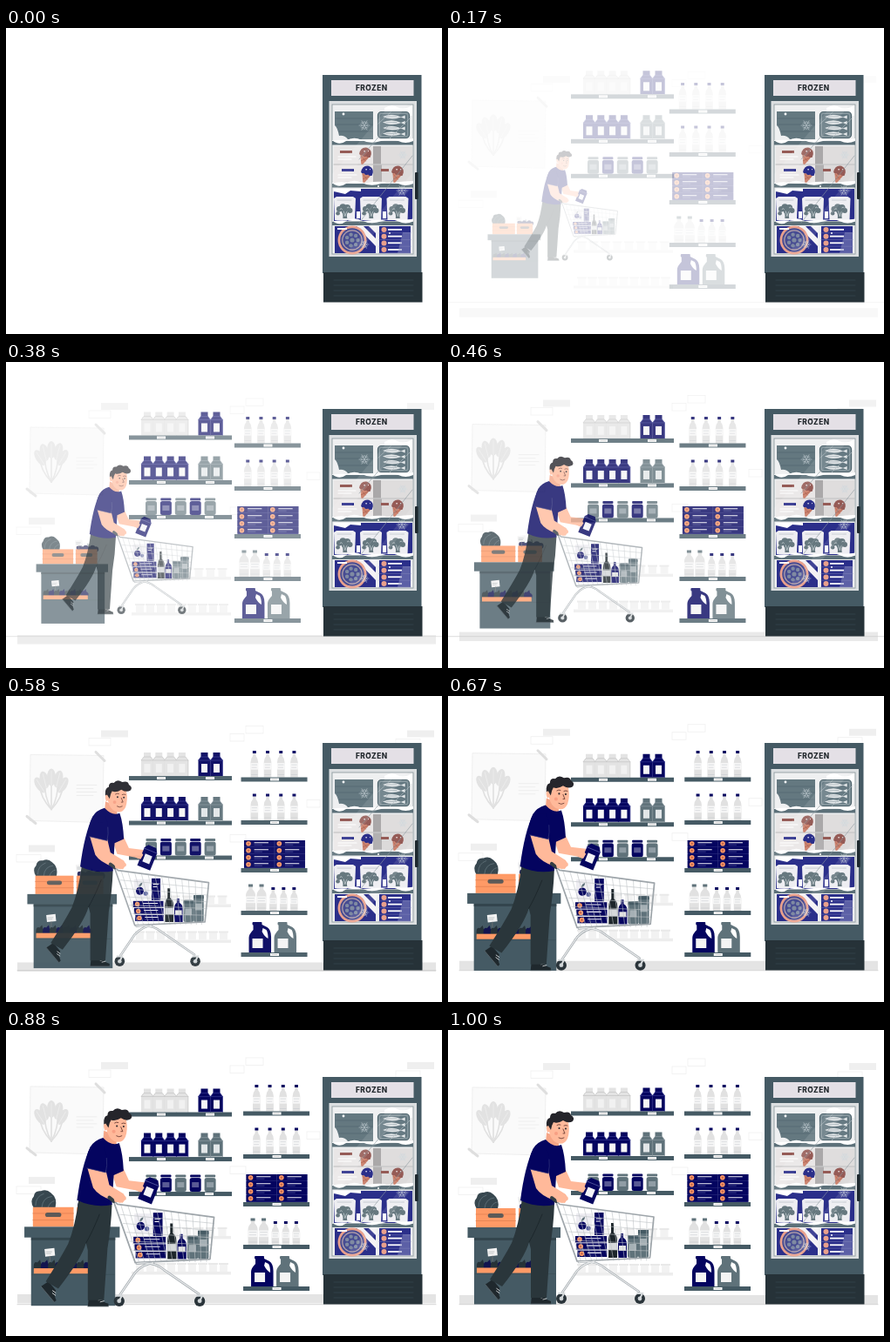
Recreate the animation shown at these times as an HTML page. Size 500 by 352 pixels, loop 1.04 s.

```html
<!DOCTYPE html>
<html lang="en">
<head>
<meta charset="utf-8">
<title>Frozen aisle</title>
<style>
html, body { margin: 0; width: 100%; height: 100%; overflow: hidden; background: #fff; }
svg { display: block; width: 500px; height: 352px; }
</style>
</head>
<body>
<svg viewBox="0 0 500 352">
  <g id="back"></g><g id="line"></g><g id="milk"></g><g id="drinks"></g>
  <g id="fridge"></g><g id="stand"></g><g id="shopper"></g>
</svg>
<script>
const NAVY = '#04045f', SLATE = '#455a64', GREY = '#5f727a', DARK = '#263238',
  ORANGE = '#ff9a66', SKIN = '#ffb99a', PALE = '#e3e3e3';

const rect = (x, y, w, h, fill, more = '') => `<rect x="${x}" y="${y}" width="${w}" height="${h}" fill="${fill}" ${more}/>`;
const path = (d, fill, more = '') => `<path d="${d}" fill="${fill}" ${more}/>`;
const stroke = (d, color, width = 1, more = '') => path(d, 'none', `stroke="${color}" stroke-width="${width}" stroke-linecap="round" ${more}`);
const circle = (x, y, r, fill) => `<circle cx="${x}" cy="${y}" r="${r}" fill="${fill}"/>`;
const oval = (x, y, rx, ry, fill) => `<ellipse cx="${x}" cy="${y}" rx="${rx}" ry="${ry}" fill="${fill}"/>`;
const move = (x, y, s, turn = 0, size = 1) => `<g transform="translate(${x} ${y}) rotate(${turn}) scale(${size})">${s}</g>`;
const each = (list, draw) => list.map(draw).join('');
const count = (n, draw) => Array.from({ length: n }, (_, i) => draw(i)).join('');
const put = (id, s) => document.getElementById(id).innerHTML = s;

// Wall, poster, floor and distant shelves
function back() {
  const solid = [[109, 38, 31], [460, 38, 31], [26, 170, 30], [310, 165, 16]];
  const hollow = [[95, 47, 25], [447, 48, 28], [275, 33, 20], [257, 42, 16], [12, 181, 28], [345, 118, 15], [257, 158, 18]];
  const leaves = [[39, 101, -32], [65, 101, 30], [44, 95, -14], [60, 94, 14], [52, 92, 0]];
  const row = (y, n) => rect(144, y, 114, 3.5, '#ededed') +
    count(n, i => rect(149 + i * 108 / n, y - 9, 9, 9, '#f2f2f2') + rect(148 + i * 108 / n, y - 10, 11, 2, '#e9e9e9'));
  return each(solid, ([x, y, w]) => rect(x, y, w, 8, '#efefef')) +
    each(hollow, ([x, y, w]) => rect(x, y, w, 8.5, 'none', 'stroke="#efefef" stroke-width=".8"')) +
    path('M28,66L112,67L111,144L27,142Z', '#fafafa', 'stroke="#ebebeb" stroke-width=".8"') +
    each(leaves, ([x, y, turn]) => stroke(`M${x},${y}Q${x},115 52,129`, '#e0e0e0', 1.6) +
      move(x, y, oval(0, 0, 5, 10, '#e2e2e2') + stroke('M0,-7V9', '#f1f1f1', .6), turn)) +
    each([101, 105, 109, 113], (y, i) => stroke(`M81,${y}H${104 - i % 2 * 4}`, '#ececec', .9)) +
    stroke('M103,63L113,73M24,137L34,145', '#dedede', 3, 'stroke-linecap="butt"') +
    row(238, 8) + row(279, 9) + rect(13, 305, 480, 10.5, '#e4e4e4');
}

const shelf = (x, y, w, tags) => rect(x, y, w, 5, SLATE) +
  each(tags, t => rect(t, y + 1, 10, 3, '#fff') + stroke(`M${t + 2},${y + 2.5}h6`, '#999', .5));

const carton = (x, y, fill, shade, label) => move(x, y,
  path('M0,27V9L3,5V0H11V5L14,9V27Z', fill) + stroke('M14,27V9L11,5H3L0,9H14', shade, .7) +
  rect(3.5, 13, 7, 10, label));

const jar = (x, fill) => rect(x, 169, 13, 16, fill, 'rx="2.5"') + rect(x + .5, 165.5, 12, 3, fill, 'rx=".8"') +
  rect(x + 1, 168.4, 11, .7, '#fff', 'opacity=".5"') + rect(x + 2.5, 174, 8, 6, '#dadde6', 'opacity=".4"');

function milk() {
  const run = (y, a, sa, la, b, sb, lb) => each([155, 168.3, 181.6, 194.9], x => carton(x, y, a, sa, la)) +
    each([220.5, 234.5], x => carton(x, y, b, sb, lb));
  return run(66.5, PALE, '#c3c3c3', '#f1f1f1', NAVY, '#363890', '#f6f6f6') + shelf(141, 93.5, 118, [173, 229]) +
    run(117.5, NAVY, '#363890', '#f6f6f6', GREY, '#8b999f', '#e2e6e8') + shelf(141, 145, 118, [173, 229]) +
    each([GREY, NAVY, GREY, NAVY, GREY], (fill, i) => jar(160 + i * 16.9, fill)) + shelf(141, 185, 118, [173, 228]);
}

const bottle = (x, y, w, h, cap) => move(x, y,
  path(`M0,${h}V13Q0,9 ${w * .3},6V2H${w * .7}V6Q${w},9 ${w},13V${h}Z`, '#e1e1e1') +
  rect(w * .27, 0, w * .46, 3, cap) + rect(0, h * .46, w, h * .25, '#f7f7f7') +
  stroke(`M1.5,${h * .53}H${w - 1.5}M1.5,${h * .63}H${w - 2}M1,${h - 3}H${w - 1}`, '#c6c9ce', .6));

const jug = (x, fill) => move(x, 260,
  path('M0,35V18Q0,14 5,9V3H15L21,6Q25.5,9 25.5,17V35Z', fill) + rect(4, 0, 11, 3.4, fill, 'rx="1"') +
  path('M16,7L20,9Q22,12 22,19Q18,17 15,11Z', '#fff') + rect(4, 19, 12, 11, '#f4f4f4'));

const mealRow = (x, y, w) => rect(x, y, w, 7.4, NAVY) + circle(x + 5, y + 3.7, 2.8, ORANGE) +
  circle(x + 5, y + 3.7, 1.3, '#c8694f') + stroke(`M${x + 12},${y + 2.8}H${x + w - 7}`, '#f3f3fa', 1.1) +
  stroke(`M${x + 12},${y + 5.2}H${x + w - 14}`, '#6a6eac', .5);

function drinks() {
  const four = y => count(4, i => bottle(282 + i * 15.2, y, 8.6, 30.5, NAVY));
  return four(63) + four(112.5) +
    rect(274.5, 166, 70, 32, '#2b2d7c') +
    count(8, i => mealRow(274.5 + i % 2 * 35.3, 166 + (i >> 1) * 8, 34.5)) +
    each([276.5, 289], x => bottle(x, 216.5, 11, 30.5, GREY)) +
    each([303.5, 315.5, 327.5], x => bottle(x, 220, 8.6, 27, NAVY)) +
    jug(280, NAVY) + jug(309, GREY) +
    each([93.5, 143, 198, 247, 295], y => shelf(271, y, 76, [304.5]));
}

const flake = (x, y, r) => each([0, 60, 120], a => move(x, y,
  stroke(`M${-r},0H${r}M${-r * .7},${-r * .25}L${-r * .4},0L${-r * .7},${r * .25}M${r * .7},${-r * .25}L${r * .4},0L${r * .7},${r * .25}`, '#cfd8dc', .5), a));

const cone = (x, y, scoop) => move(x, y,
  path('M-6,1L6,1L1,13L-1,13Z', '#cd8571') + stroke('M-4,4L3,8M4,4L-2,9', '#a9604f', .6) +
  path('M-7,2Q-8,-7 0,-8Q8,-7 7,2Q4,4 2,2Q-1,5 -3,2Q-5,4 -7,2Z', scoop) + circle(-2, -3, .8, '#fff') + circle(2.5, -4.5, .6, '#fff'), 18, .95);

const broccoli = (x, y) => move(x, y,
  each([[-7, -2, 4], [-2, -5, 4.6], [4, -4, 4.6], [8, 0, 3.6], [-9, 4, 2.8], [0, 0, 4]], ([a, b, r]) => circle(a, b, r, '#66787f')) +
  path('M-5,0Q-1,4 -2,11H4Q2,4 7,1Z', '#66787f') + stroke('M-1,1L1,8L3,2M-6,-2q2,-2 3,0M4,-4q2,-2 3,0', '#dde3e6', .8), 0, .82);

const ledge = (y, dip) => rect(374, y, 93, 4.5, '#5c7079') +
  path(`M374,${y}q8,${-dip} 18,-1t22,0t20,-1t18,0t15,-1v3q-9,4 -17,0t-20,0t-22,-1t-18,1t-16,-1Z`, '#fff');

function fridge() {
  const blue = '#2b2f8a', brown = '#955b56';
  const top = path('M377,96H421V128H392Q388,123 382,124Q380,114 377,112Z', '#647880') +
    stroke('M378,104H420M379,111H420M382,119H420', '#4f646d', .6) + circle(387, 99, 1.4, '#fff') + flake(411, 112, 6) +
    path('M434,92Q442,87 449,91T466,89V101H434Z', '#fff') +
    rect(426.5, 96.5, 36, 30, '#84959c', 'rx="4" stroke="#4b616a" stroke-width="1.2"') +
    rect(429, 99, 31, 25, '#667a83', 'rx="2"') +
    count(4, i => path(`M431,${102 + i * 6.5}q11,-5 22,0l5,-2v5l-5,-2q-11,4 -22,-1Z`, '#e4e8ea', 'stroke="#4b616a" stroke-width=".5"') +
      stroke(`M436,${102 + i * 6.5}h12`, '#8a999f', .6)) +
    stroke('M427,110L441,97M440,127L463,104', '#b4c0c5', .6);
  const ice = rect(376, 136, 45, 20.5, '#e9e6e6') + rect(421, 136, 9, 20.5, '#aaa8a9') + rect(430, 136, 36, 20.5, '#dfdddd') +
    rect(376, 157.5, 45, 20.5, '#ebe8e8') + rect(421, 157.5, 10, 20.5, '#b2b0b1') + rect(431, 157.5, 35, 20.5, '#dcdada') +
    rect(383, 141, 14, 3, brown) + rect(385, 162, 14, 3, blue) + rect(430, 162, 9, 3, brown) +
    stroke('M381,148H401M381,151H396M381,169H402M381,172H396', '#fff', 1.2) +
    stroke('M376,157H466', '#999', .6) +
    cone(412, 145, brown) + cone(414, 166, blue) + cone(449, 166, brown) + flake(455, 146, 5);
  const veg = rect(376, 185, 90, 37, blue) + path('M376,185H407V188L395,187L389,191L376,188Z', '#fff') +
    each([377, 407, 437.5], x => path(`M${x - 1},196L${x + 2},194H${x + 21}L${x + 24},196L${x + 23},221H${x}Z`, '#eeeef2') +
      stroke(`M${x + 3},198h16`, '#b9bfc6', .8) + broccoli(x + 11, 210)) +
    each([402, 432], x => rect(x, 211, 4, 8, '#fff')) + flake(454, 187, 6);
  const pizza = rect(377, 228, 47, 31, blue) +
    path('M402,228h8l14,14v9ZM416,228h8v8Z', '#f4f2f5') +
    circle(397, 244, 16.5, '#e9a08c') + circle(397, 244, 13.8, '#474c92') +
    circle(397, 244, 11.8, '#b9a4ab') + circle(397, 244, 10.6, '#474c92') +
    count(7, i => circle(397 + 6.5 * Math.cos(i * .9), 244 + 6.5 * Math.sin(i * .9), 2.2, '#7f8aa2')) +
    circle(397, 244, 2.6, '#7f8aa2') + rect(380, 230, 11, 2, '#fff') + flake(411, 249, 5) +
    rect(428, 228, 36, 31, blue) +
    count(4, i => circle(433.5, 232 + i * 7.7, 3, '#e9a08c') + rect(438, 231 + i * 7.7, 16, 1.8, '#fff') +
      stroke(`M428,${235.8 + i * 7.7}h36`, '#6669a8', .6)) +
    path('M455,235h9v24h-15Z', '#8e91c2', 'opacity=".5"');
  return rect(363, 54, 113.5, 228, SLATE) + rect(364, 281, 113.5, 34.5, DARK) +
    stroke('M376,290H467M376,296H467M376,302H467M376,308H467', '#34454d', .8) +
    rect(373, 60, 94.5, 18, '#e4e0e6') +
    '<text x="419.2" y="72.2" text-anchor="middle" font-family="Inter, Roboto, sans-serif" font-weight="800" font-size="8.4" letter-spacing=".4" fill="#22282d">FROZEN</text>' +
    stroke('M414.6,65.4l1.4,1.2l1.4,-1.2', '#22282d', .8) +
    rect(370.5, 84, 100.5, 179, '#dcdfe1') + rect(374, 88, 93, 172, '#eff0f1', 'stroke="#87949a" stroke-width=".8"') +
    top + ledge(130, 2) + ice + ledge(179, 3) + veg + ledge(222.5, 2) + pizza +
    path('M374,168L441,88H461L374,192ZM390,260L467,165V181L403,260Z', '#fff', 'opacity=".1"') +
    stroke('M405,224L466,147M405,151L438,113', '#8d999f', .6) +
    circle(427, 182, 1, '#fff') + circle(440, 236, 1, '#fff') + rect(469, 166, 3.6, 31, '#1d282e', 'rx="1"');
}

function stand() {
  const crate = (x, w) => rect(x, 205, w, 22, ORANGE) + stroke(`M${x},212h${w}M${x},219.5h${w}`, '#d9794c', .6) +
    rect(x + w / 2 - 9, 211, 18, 5, '#5d5a58', 'rx="2.5"');
  const tag = (x, y) => rect(x, y, 11, 8.5, '#f3f3f3', `transform="rotate(-6 ${x} ${y})"`) +
    stroke(`M${x + 2},${y + 3}h6m-6,2h5`, '#a9afb3', .7) + stroke(`M${x + 6},${y + 8}v6`, '#777', .7);
  return path('M33,206Q28,198 33,193Q34,186 41,187Q47,184 52,189Q60,195 57,206Z', '#37474f') +
    stroke('M35,203Q35,193 44,190M42,205Q43,194 53,193M49,205Q51,199 56,198', '#61737b', .8) +
    crate(32, 45.5) +
    count(6, i => circle(86 + i * 5, 203 + i % 2 * 2, 4, '#25275a')) + stroke('M88,197l2,4M99,197l1,4', '#455a64', 1) +
    crate(81, 32) + tag(80, 192) +
    rect(30, 238, 94, 77.5, SLATE) + rect(30, 239, 94, 3, '#33454d') +
    count(8, i => path(`M${33 + i * 8},275q-1,-10 4,-8l3,-3l1,4q5,2 2,7Z`, i % 2 ? '#12144f' : DARK)) +
    rect(33, 273.5, 66, 6, ORANGE) + tag(45, 252) +
    rect(22.5, 227, 106.5, 12, SLATE) + stroke('M31,280.5H123', '#3b4e57', .7);
}

function cart() {
  const steel = '#a1a8ad';
  const goods = rect(147, 211, 18, 22, '#eeedf2') + circle(154, 225, 4.6, NAVY) + path('M153,220q0,-4 4,-5q0,4 -4,5', GREY) + circle(161, 228, 2.6, '#5f68a0') +
    rect(168, 210, 10.5, 26, NAVY) + stroke('M170,217h6m-6,3h4', '#fff', 1) +
    count(3, i => mealRow(146 + i * 1.2, 237 + i * 8.3, 36 - i)) +
    path('M184,262V242Q184,236 187,233V222H190V233Q194,236 194,242V262Z', '#1d262b') + rect(184, 245, 10, 8, '#d5d8da') +
    path('M195,262V246Q195,241 198,239V234H201V239Q205,241 205,246V262Z', NAVY) + rect(196, 248, 8, 6, '#e5e5e5') +
    each([[206, 236], [218, 230]], ([x, y]) => rect(x, y, 12, 262 - y, GREY, 'rx="2"') + rect(x, y, 12, 4, SLATE) + rect(x + 2, y + 10, 8, 8, '#a5b0b5'));
  const grid = count(13, i => `M${132 + i * 8},${201.5 + i * 1.05}L${152 + i * 6.3},265`) +
    count(5, i => `M${131 + i * 3.6},${212 + i * 10}L${236 - i * .8},${222 + i * 8}`);
  const legs = 'M168,266Q156,268 148,277L131,302M150,267Q168,264 180,274L219,301';
  const wheel = (x, y) => circle(x, y, 6, '#2a343a') + circle(x, y, 2.4, '#c8cdd0') + stroke(`M${x - 3},${y - 6}h6l-3,6`, '#d5d9db', 2);
  return goods + stroke(grid, '#bcc1c5', .6) +
    stroke('M123,195L128,200.5L236,215L231.5,262L148,266Z', '#9ea5aa', 1.7, 'stroke-linejoin="round"') +
    stroke(legs, steel, 2.6) + stroke(legs, '#e6e8e9', 1.3) +
    wheel(130, 309) + wheel(220, 309) + stroke('M119,193L124,197', '#333d43', 4);
}

function person() {
  const ink = '#25252b', pants = '#2a363b';
  const shoe = path('M0,0L13,0Q15,5 22,7V10H-1Z', '#1f282d') + stroke('M-1,10H22', '#59646a', .8) + stroke('M11,3l4,-1M13,5l4,-1', '#fff', .7);
  const held = path('M-7,-9L-4,-13H5L8,-8V12H-7Z', NAVY) + rect(-3.5, -3, 8, 9, '#f4f4f8') + stroke('M-7,-8H8', '#5558a0', .7);
  return move(51, 287, shoe, 50) + move(96, 305, shoe) +
    path('M85,194L122,200Q121,226 117,250L113,308H95L95,252L93,244Q88,262 62,295L48,287Q64,262 73,245Q81,225 85,194Z', pants) +
    stroke('M108,212Q100,232 93,244', '#1c262b', .9) +
    path('M122,166L135,161L141,174L158,176L164,181L157,188L149,185L127,181Z', SKIN) +
    move(163, 185, held, 22, 1.1) + path('M149,176q6,1 9,6l-3,5q-5,-1 -9,-4Z', SKIN) +
    path('M113,118L112,130Q119,137 127,133L127,124Z', '#f5a586') +
    path('M112,126Q102,129 98,136Q88,157 83,196Q102,205 122,201L124,168L135,163Q134,143 130,132Q121,136 112,126Z', NAVY) +
    path('M94,158L115,162L119,179L135,189L138,195L131,199L122,196Q107,191 101,182Z', SKIN) +
    path('M98,136Q92,147 93,160L115,165Q119,150 113,136Z', NAVY) +
    stroke('M116,149Q117,157 115,165L94,160', '#34387d', .7) +
    path('M116,104Q117,98 127,99Q137,99 138,106Q140,117 137,125Q133,133 125,130Q118,127 116,117Z', SKIN) +
    path('M114,118Q111,110 115,109Q118,110 118,116Z', SKIN) +
    path('M113,111Q112,102 117,101Q117,95 123,96Q127,91 133,95Q140,93 141,98Q146,101 143,105Q138,108 132,104Q126,108 121,106Q119,109 118,115L115,110Z', ink) +
    circle(127.5, 113, 1, ink) + circle(135, 113.5, 1, ink) +
    stroke('M125,109.5q2,-1.5 4,-.5M133,110q2,-1 4,0M132,114l2,5h-2M127,124q3,2 6,0', '#5e332d', .8) +
    circle(124, 119, 2, '#f79f83');
}

put('back', back());
put('milk', milk());
put('drinks', drinks());
put('fridge', fridge());
put('stand', stand());
put('shopper', person() + cart() + path('M123,190L133,188L138,193L134,199L125,198Z', SKIN));
put('line', stroke('M0,315.7H500', '#c9c9c9', .8));

// Ease with overshoot: cubic-bezier(.36, -.01, .5, 1.38)
function ease(x) {
  const curve = (a, b, s) => 3 * a * s * (1 - s) ** 2 + 3 * b * s * s * (1 - s) + s ** 3;
  let lo = 0, hi = 1;
  for (let i = 0; i < 24; i++) {
    const mid = (lo + hi) / 2;
    if (curve(.36, .5, mid) < x) lo = mid; else hi = mid;
  }
  return curve(-.01, 1.38, lo);
}

const slide = (x, y) => p => `translate(${x * (1 - p)} ${y * (1 - p)})`;
const zoom = (x, y) => p => `translate(${x} ${y}) scale(${.5 + p / 2}) translate(${-x} ${-y})`;
const parts = Object.entries({
  back: slide(0, 20), milk: slide(0, -20), drinks: slide(-20, 0),
  stand: zoom(76, 251), shopper: zoom(139.5, 204.5)
}).map(([id, pose]) => [document.getElementById(id), pose]);
const line = document.getElementById('line');

function draw(now) {
  const t = now % 1040;
  const step = Math.floor((t + 4.5) * .024); // 24 poses a second
  const x = Math.min(1, step / 24 + .03);
  const p = x < 1 ? ease(x) : 1;
  const alpha = step < 2 ? 0 : Math.min(1, Math.max(0, p) ** .75);
  for (const [node, pose] of parts) {
    node.setAttribute('transform', pose(p));
    node.setAttribute('opacity', alpha);
  }
  line.setAttribute('opacity', alpha);
  line.firstChild.setAttribute('d', step < 14 ? 'M0,315.7H500' : 'M13,315.7H493');
}

const start = performance.now();
function tick() {
  draw(performance.now() - start);
  requestAnimationFrame(tick);
}
tick();
</script>
</body>
</html>
```
